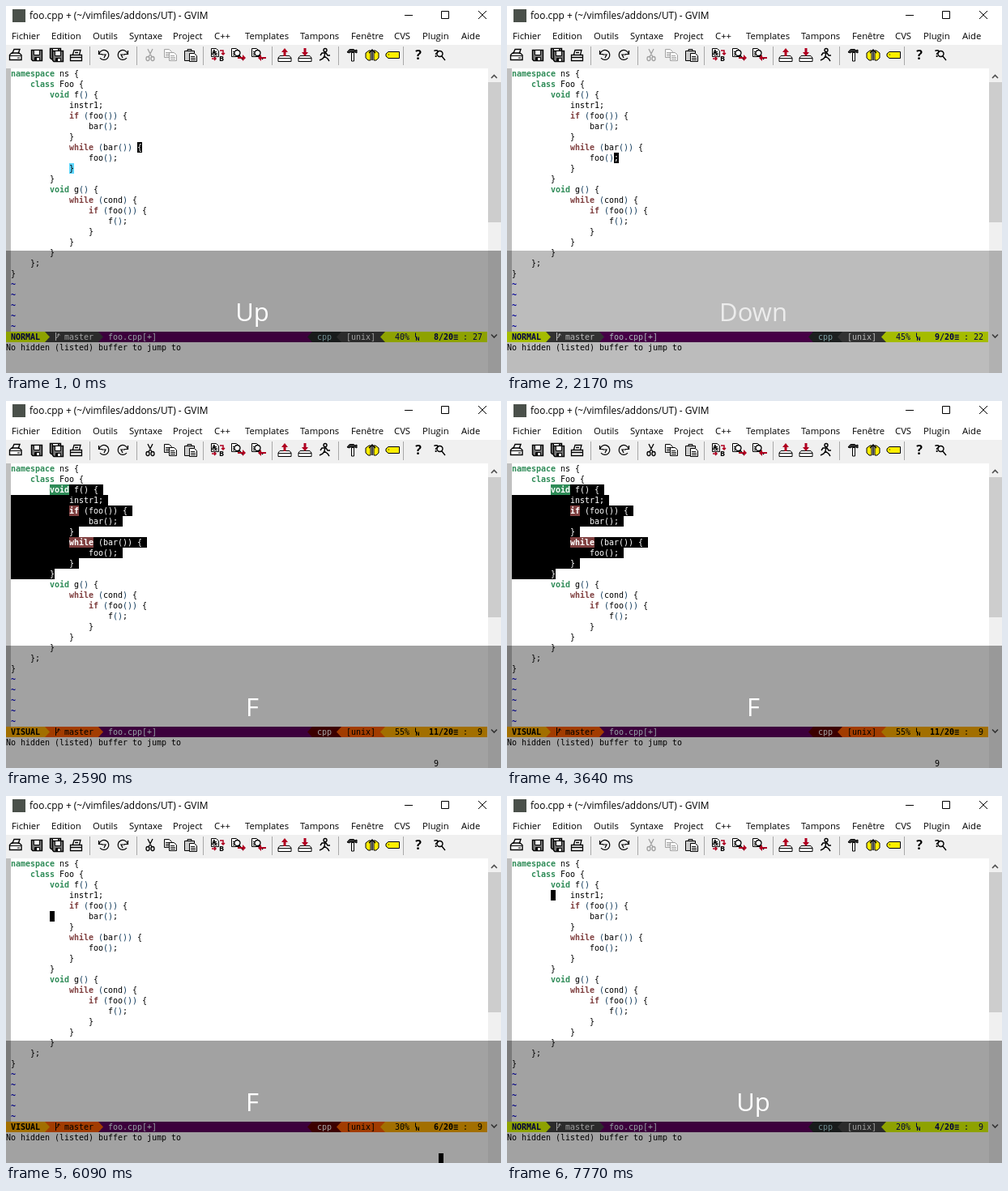
Write an HTML page with a canvas that moves like this. It is 611x453 px and loops after 8 s.

```html
<!DOCTYPE html>
<html lang="fr">
<head>
<meta charset="utf-8">
<style>
html, body { margin: 0; width: 611px; height: 453px; overflow: hidden; background: #fff; }
canvas { display: block; }
</style>
</head>
<body>
<canvas id="stage" width="611" height="453"></canvas>
<script>
const g = document.getElementById('stage').getContext('2d', { alpha: false });
const MONO = '"DejaVu Sans Mono", monospace';
const SANS = '"Open Sans", "Noto Sans", sans-serif';
const LOOP = 8000, CW = 6, LH = 13, LEFT = 6, TOP = 77;

const code = `namespace ns {
    class Foo {
        void f() {
            instr1;
            if (foo()) {
                bar();
            }
            while (bar()) {
                foo();
            }
        }
        void g() {
            while (cond) {
                if (foo()) {
                    f();
                }
            }
        }
    };
}`.split('\n');

// time, line, column, key, extra state
const steps = [
  [0, 8, 27, 'Up', { match: [10, 13] }],
  [140, 7, 13, 'Up', { match: [5, 24] }],
  [560, 8, 27, 'Down', { match: [10, 13] }],
  [700, 9, 22, 'Down'],
  [2240, 9, 22, 'V', { cmd: '1', wide: true }],
  [2310, 9, 22, 'I', { cmd: 'i', wide: true, visual: true }],
  [2450, 9, 22, 'F', { wide: true, visual: true, pending: true }],
  [2590, 11, 9, 'F', { cmd: '9', visual: true, select: true }],
  [3710, 11, 9, 'Escape', { cmd: '9', visual: true, select: true }],
  [3780, 11, 9, 'Escape', { match: [3, 18] }],
  [4270, 10, 9, 'Up'],
  [4410, 9, 9, 'Up'],
  [4550, 8, 9, 'Up'],
  [4690, 7, 9, 'Up'],
  [4830, 6, 9, 'Up'],
  [5670, 6, 9, 'V', { cmd: '1' }],
  [5740, 6, 9, 'V', { cmd: '1', visual: true }],
  [5810, 6, 9, 'I', { cmd: 'i', visual: true }],
  [6090, 6, 9, 'F', { visual: true, pending: true }],
  [6230, 11, 9, 'F', { cmd: '9', visual: true, select: true }],
  [6650, 11, 9, 'Escape', { cmd: '9', visual: true, select: true }],
  [6720, 11, 9, 'Escape', { match: [3, 18] }],
  [6790, 10, 9, 'Up'],
  [6930, 9, 9, 'Up'],
  [7070, 8, 9, 'Up'],
  [7210, 7, 9, 'Up'],
  [7350, 6, 9, 'Up'],
  [7420, 5, 9, 'Up'],
  [7770, 4, 9, 'Up']
];
const blinks = [[1330, 1540], [1960, 2170], [5460, 5670]];

const themes = {
  normal: { a: '#dfff00', aInk: '#00005f', b: '#444444', bInk: '#ffffff', c: '#262a2a', cInk: '#a8d8dc' },
  visual: { a: '#ffaf00', aInk: '#000000', b: '#ff5f00', bInk: '#000000', c: '#5f0000', cInk: '#ffffff' }
};

const colX = c => LEFT + (c - 1) * CW;
const rowY = r => TOP + (r - 1) * LH;

function rect(x, y, w, h, color) {
  g.fillStyle = color;
  g.fillRect(x, y, w, h);
}

function text(s, x, y, font, color, align = 'left') {
  g.font = font;
  g.fillStyle = color;
  g.textAlign = align;
  g.fillText(s, x, y);
}

// Fixed-pitch text, one cell per character
function mono(s, x, top, color = '#000', bold = false) {
  const font = (bold ? 'bold ' : '') + '10px ' + MONO;
  [...s].forEach((ch, i) => {
    if (ch !== ' ') text(ch, x + i * CW, top + 10, font, color);
  });
}

function path(d, x, y, stroke, fill, width = 1) {
  const p = new Path2D(d);
  g.save();
  g.translate(x, y);
  g.lineWidth = width;
  if (fill) { g.fillStyle = fill; g.fill(p); }
  if (stroke) { g.strokeStyle = stroke; g.stroke(p); }
  g.restore();
}

function titleBar() {
  rect(8, 4, 16, 16, '#4a504a');
  text('foo.cpp + (~/vimfiles/addons/UT) - GVIM', 29, 16, '11.9px ' + SANS, '#000');
  path('M492 11.5H502 M537.5 6.5H546.5V15.5H537.5Z M583 6L593 16M593 6L583 16', 0, 0, '#000');
}

function menuBar() {
  const items = { Fichier: 7, Edition: 56, Outils: 107, Syntaxe: 152, Project: 206, 'C++': 257,
    Templates: 295, Tampons: 363, 'Fenêtre': 426, CVS: 479, Plugin: 514, Aide: 562 };
  for (const name in items) text(name, items[name], 41, '11.3px ' + SANS, '#000');
}

const K = '#000', RED = '#b00020', YEL = '#ffee00';
const page = 'M.5 .5H6.5L9.5 3.5V10.5H.5Z M2 4.5H7M2 6.5H8M2 8.5H8';
const lens = 'M9 4A3.5 3.5 0 1 1 2 4A3.5 3.5 0 1 1 9 4Z M8 7L12 12';
const tray = 'M2 8.5H14L16 11V15.5H0V11Z M0 11.5H16';

function floppy(x, y) {
  path('M.5 .5H13.5V13.5H2L.5 12Z', x, y, K, '#777', 1.4);
  path('M3.5 .5H10.5V6.5H3.5Z M4.5 9.5H10.5V13.5H4.5Z', x, y, K, '#fff');
  rect(x + 5, y + 10, 2, 3, K);
}

function toolbar(canCut) {
  rect(0, 48, 611, 29, '#f0f0f0');
  for (const x of [103, 161, 243, 328, 410, 490]) rect(x, 50, 1, 23, '#a8a8a8');
  const y = 53, ink = canCut ? K : '#a0a0a0';

  path('M1.5 7.5L4 5H13L16 7.5V13.5H1.5Z M4.5 6L7 .5H14L12 6', 3, y, K, '#fff', 1.4);
  path('M1.5 8.5H15.5 M11 11H14', 3, y, K, null, 1.2);
  floppy(31, y + 1);
  floppy(54, y - 1);
  floppy(57, y + 2);
  path('M4.5 7L6 1.5H14L12.5 7 M1.5 7.5H15.5V14.5H1.5Z M1.5 10.5H15.5 M7 4.5H11', 78, y, K, '#fff', 1.3);

  path('M2.5 3V7.5H7 M3 7A6 6 0 1 1 4 12 M6 8H11L9 12', 112, y - 1, K, null, 1.2);
  path('M13.5 3V7.5H9 M13 7A6 6 0 1 0 12 12 M10 8H5L7 12', 137, y - 1, K, null, 1.2);

  path('M5 0L10 10M11 0L6 10 M7 12A2 2.5 0 1 1 3 12A2 2.5 0 1 1 7 12 M13 12A2 2.5 0 1 1 9 12A2 2.5 0 1 1 13 12',
    170, y, ink, null, 1.3);
  path(page, 195, y, ink, '#fff');
  path(page, 201, y + 4, ink, '#fff');
  path('M.5 2.5H12.5V14.5H.5Z M4 2.5V.5H9V2.5', 220, y, K, '#ccc');
  path(page, 226, y + 5, K, '#fff');

  path(page, 253, y - 1, K, '#fff');
  text('A', 254, y + 7, 'bold 8px ' + SANS, K);
  text('B', 263, y + 15, 'bold 9px ' + SANS, K);
  path('M11 2H15V6M13 5L15 7L17 5 M1 12H6M4 10L6 12L4 14', 253, y, RED, null, 1.5);
  for (const [x, arrow] of [[278, 'M8 9H14V6L18 10L14 14V11H8Z'], [303, 'M18 9H12V6L8 10L12 14V11H18Z']]) {
    path(page, x, y - 1, K, '#fff');
    path(lens, x + 2, y + 1, K, '#fff', 1.3);
    path(arrow, x, y + 1, null, RED);
  }

  path(tray, 336, y, K, '#fff');
  path('M8 -1L12 4H9.5V9H6.5V4H4Z', 336, y, null, RED);
  path(tray, 361, y, K, '#fff');
  path('M8 9L12 4H9.5V-1H6.5V4H4Z', 361, y, null, RED);
  path('M10 1.5A2 2 0 1 1 6 1.5A2 2 0 1 1 10 1.5 M8 4L7 9L11 12L13 15 M7 9L5 12L1 14 M2 8L4 5H9L11 8H14',
    386, y, K, null, 1.4);

  path('M1 4L4 .5H9L11 2L13 1V5L11 4H4V5Z', 420, y, K, '#333');
  path('M5.5 4.5H8.5V15H5.5Z', 421, y, K, '#fff');
  path('M0 5L4 2H6V14H3L0 11Z M10 2H12L16 5V11L13 14H10Z', 444, y, K, YEL);
  path('M4 5L8 1L12 5 M8 2V14', 444, y, K, null, 1.4);
  path('M0 6L3 3.5H16.5V11.5H3L0 9Z', 469, y, K, YEL);
  path('M3 7H4', 469, y, K);
  text('?', 509, y + 13, 'bold 16px ' + SANS, K, 'center');
  text('?', 531, y + 10, 'bold 13px ' + SANS, K, 'center');
  path(lens, 530, y + 2, K, null, 1.4);
}

function codeLine(s, row, from) {
  const y = rowY(row);
  const selected = from > 0;
  if (selected) {
    const end = row === 11 ? s.length : s.length + 1;
    rect(colX(from), y, (end - from + 1) * CW, LH, '#000');
  }
  for (const m of s.matchAll(/\w+|[()]|[^\w\s()]/g)) {
    const x = colX(m.index + 1), word = m[0];
    const type = /^(namespace|class|void)$/.test(word);
    const flow = /^(if|while)$/.test(word);
    const color = type ? '#2e8b57' : flow ? '#804040' : /[()]/.test(word) ? '#103a5c' : '#000';
    if (selected && (type || flow)) rect(x, y, word.length * CW, LH, color);
    mono(word, x, y, selected ? '#fff' : color, type || flow);
  }
}

function block(row, col, bg, ink) {
  rect(colX(col), rowY(row), CW, LH, bg);
  mono(code[row - 1][col - 1] || ' ', colX(col), rowY(row), ink);
}

function editor(s, cursorOn) {
  rect(0, TOP, LEFT, 325, '#c0c0c0');
  code.forEach((line, i) => {
    const row = i + 1;
    const from = s.select && row >= 3 && row <= 11 ? (row === 3 ? 9 : 1) : 0;
    codeLine(line, row, from);
  });
  for (let row = 21; row <= 25; row++) mono('~', LEFT, rowY(row), '#0000cc', true);
  if (s.match) block(...s.match, '#5fd7ff', '#000');
  if (cursorOn) block(s.row, s.col, '#000', '#fff');
  if (s.wide) block(s.row, s.col + 1, '#000', '#fff');

  rect(595, TOP, 16, 376, '#f0f0f0');
  rect(595, 94, 16, 173, '#cdcdcd');
  path('M599 89L602.5 85.5L606 89 M599 405.5L602.5 409L606 405.5', 0, 0, '#505050', null, 1.6);
}

function arrow(x, dir, color, back) {
  rect(x, 402, CW, LH, back);
  path(dir > 0 ? 'M0 0L6 6.5L0 13Z' : 'M6 0L0 6.5L6 13Z', x, 402, null, color);
}

function statusLine(s) {
  const t = s.visual ? themes.visual : themes.normal, y = 402, mid = '#5f005f';
  rect(0, y, 48, LH, t.a);
  rect(54, y, 60, LH, t.b);
  rect(120, y, 252, LH, mid);
  rect(378, y, 30, LH, t.c);
  rect(414, y, 48, LH, t.b);
  rect(468, y, 126, LH, t.a);
  arrow(48, 1, t.a, t.b);
  arrow(114, 1, t.b, mid);
  arrow(372, -1, t.c, mid);
  arrow(408, -1, t.b, t.c);
  arrow(462, -1, t.a, t.b);

  mono(s.visual ? 'VISUAL' : 'NORMAL', 6, y, t.aInk, true);
  path('M1.5 1V11 M1.5 8Q5 7 5 3 M3.5 4.5L5 2.5L6.5 4.5', 60, y, t.bInk);
  mono('master', 72, y, t.bInk);
  mono('foo.cpp[+]', 126, y, '#e8ffff');
  mono('cpp', 384, y, t.cInk);
  mono('[unix]', 420, y, t.bInk);
  mono(s.row * 5 + '%', 480, y, t.aInk);
  path('M1.5 1.5V6.5H3.5 M2.5 11V6.5L5.5 11V6.5', 504, y, t.aInk);
  mono((s.row + '/20').padStart(5) + '≡', 522, y, t.aInk, true);
  mono(':' + String(s.col).padStart(3), 564, y, t.aInk);
}

function commandArea(s) {
  mono('No hidden (listed) buffer to jump to', 0, 415);
  if (s.cmd) mono(s.cmd, 528, 441);
  if (s.pending) rect(534, 441, CW, 12, '#000');
}

function keyOverlay(key, t) {
  const faded = t >= 1890 && t < 2240 ? Math.floor((t - 1890) / 70) + 1 : 0;
  g.globalAlpha = 1 - faded * 0.056;
  rect(0, 302, 611, 151, 'rgba(0,0,0,.363)');
  text(key, 304, 389, '31px ' + SANS, '#fff', 'center');
  g.globalAlpha = 1;
}

function draw(t) {
  const [, row, col, key, extra] = steps.findLast(e => e[0] <= t);
  const s = { row, col, ...extra };
  const cursorOn = !blinks.some(([a, b]) => t >= a && t < b);
  rect(0, 0, 611, 453, '#fff');
  titleBar();
  menuBar();
  toolbar(s.visual);
  editor(s, cursorOn);
  statusLine(s);
  commandArea(s);
  keyOverlay(key, t);
}

const start = performance.now();
function tick(now) {
  draw(Math.max(0, now - start) % LOOP);
  requestAnimationFrame(tick);
}
draw(0);
requestAnimationFrame(tick);
</script>
</body>
</html>
```
